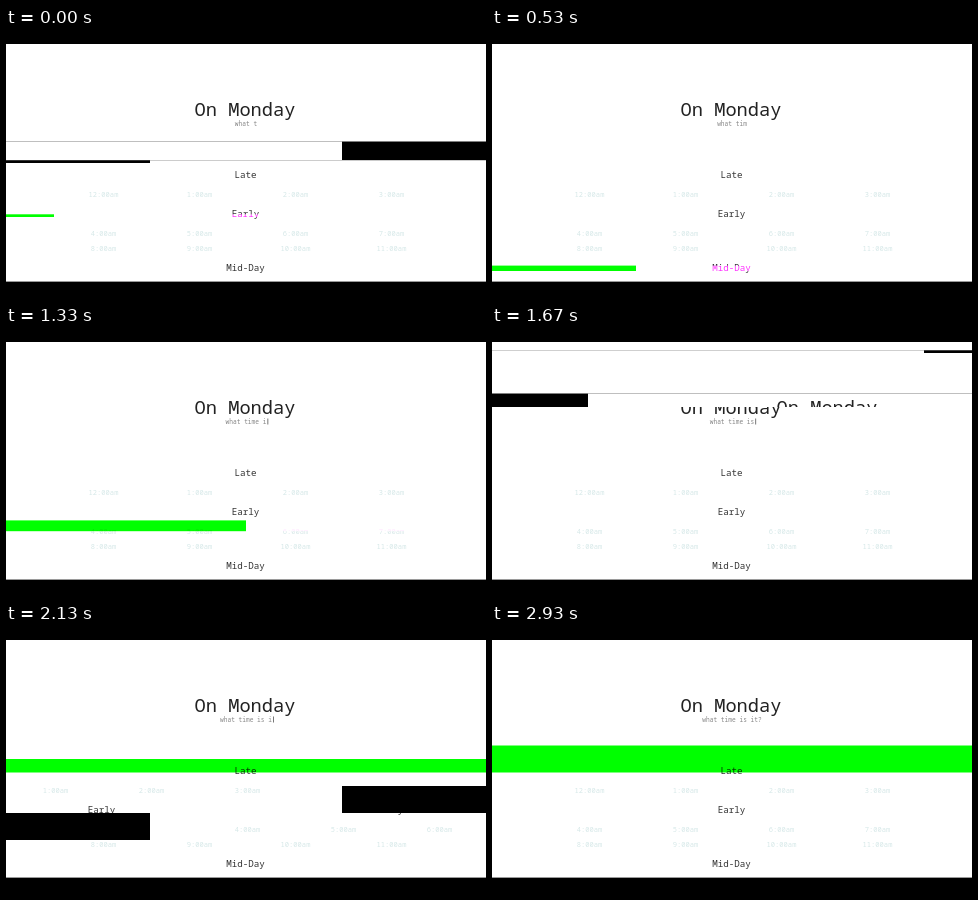
Animation of 480x270 px, one loop 2.99 s. Source, as an HTML page:

```html
<!DOCTYPE html>
<html lang="en">
<head>
<meta charset="utf-8">
<title>On Monday</title>
<style>
  html, body { margin: 0; width: 100%; height: 100%; overflow: hidden; background: #000; }
  svg { display: block; width: 100vw; height: 100vh; }
  text { font-family: "Noto Sans Mono", "DejaVu Sans Mono", monospace; font-weight: 300; text-anchor: middle; fill: #222; white-space: pre; }
  .title { font-size: 18.7px; }
  .head { font-size: 9.2px; fill: #333; }
  .ask { font-size: 6.2px; fill: #888; }
  .time { font-size: 7.1px; fill: #d6e8e8; }
  .scene { isolation: isolate; }
  #tint { fill: #0f0; mix-blend-mode: multiply; }
  #glow { fill: #f0f; mix-blend-mode: lighten; }
</style>
</head>
<body>
<svg viewBox="0 0 480 270">
  <defs>
    <clipPath id="clip0"><rect width="480"/></clipPath>
    <clipPath id="clip1"><rect width="480"/></clipPath>
  </defs>
  <rect width="480" height="270"/>
  <g class="scene">
    <g id="page">
      <rect y="16" width="480" height="237.6" fill="#fff"/>
      <text class="title" x="239" y="88">On Monday</text>
      <text class="ask" id="ask" x="240" y="97.5"></text>
      <rect id="caret" y="92.5" width=".8" height="6" fill="#555"/>
      <text class="head" x="239.5" y="150.4">Late</text>
      <text class="head" x="239.5" y="189">Early</text>
      <text class="head" x="239.5" y="242.6">Mid-Day</text>
    </g>
    <rect id="tint"/>
    <rect id="glow"/>
  </g>
  <g clip-path="url(#clip0)"><rect width="480" height="270"/><use href="#page" id="slice0"/></g>
  <g clip-path="url(#clip1)"><rect width="480" height="270"/><use href="#page" id="slice1"/></g>
</svg>
<script>
const $ = id => document.getElementById(id);
const set = (el, attrs) => { for (const k in attrs) el.setAttribute(k, attrs[k]); };
const LOOP = 2990, STEP = 200 / 3, QUESTION = "what time is it?";
const PX = 2.7; // one percent of the stage height
const COL = 48; // one tenth of the stage width

// Each state: colour band [top %, bottom %, width], then slices [top %, bottom %, shift].
const states = [
  [[69, 70, 1], [42, 49, -3], [49, 50, 3]],
  [[30, 35, 2]],
  [[10, 30, 4]],
  [[84, 94, 3]],
  [[60, 62, 6], [20, 24, 1], [36, 40, -2]],
  [[45, 55, 10]],
  [[50, 55, 10], [60, 70, -3], [70, 80, 3]],
  [[72, 76, 5]],
  [[88, 90, 3]],
  [[40, 44, 2], [56, 60, -1], [14, 17, 2]],
  [[64, 65, 4]],
  [null, [6, 9, -2], [78, 83, 1]],
  [null, [9, 10, -1], [25, 30, 2]]
];

function addTimes() {
  const rows = [[168.5, 12, 1, 2, 3], [207.5, 4, 5, 6, 7], [222.5, 8, 9, 10, 11]];
  for (const [y, ...hours] of rows) hours.forEach((hour, i) => {
    const t = document.createElementNS("http://www.w3.org/2000/svg", "text");
    set(t, { class: "time", x: 97.5 + i * 96, y });
    t.textContent = hour + ":00am";
    $("page").append(t);
  });
}

function type(step) {
  const count = Math.min(QUESTION.length, 6 + Math.max(0, Math.floor((step - .2) * STEP / 250)));
  const blink = step * STEP % 500;
  $("ask").textContent = QUESTION.slice(0, count);
  set($("caret"), { x: 241 + count * 1.86, opacity: blink >= 100 && blink < 350 ? 1 : 0 });
}

function glitch(step) {
  const [band, ...slices] = states[step % states.length];
  const [top, bottom, cols] = band || [0, 0, 0];
  const y = top * PX, height = (bottom - top) * PX, width = cols * COL;
  set($("tint"), { y, height, width });
  set($("glow"), { x: width, y, height, width: 480 - width });
  for (let i = 0; i < 2; i++) {
    const [from, to, shift] = slices[i] || [0, 0, 0];
    set($("clip" + i).firstElementChild, { y: from * PX, height: (to - from) * PX });
    set($("slice" + i), { x: shift * COL });
  }
}

let last = -1;
const start = performance.now();
function draw(now) {
  const t = Math.max(0, now - start) % LOOP;
  const step = Math.min(44, Math.floor((t + 5) / STEP));
  if (step !== last) {
    type(step);
    glitch(step);
    last = step;
  }
  requestAnimationFrame(draw);
}

addTimes();
draw(start);
</script>
</body>
</html>
```
